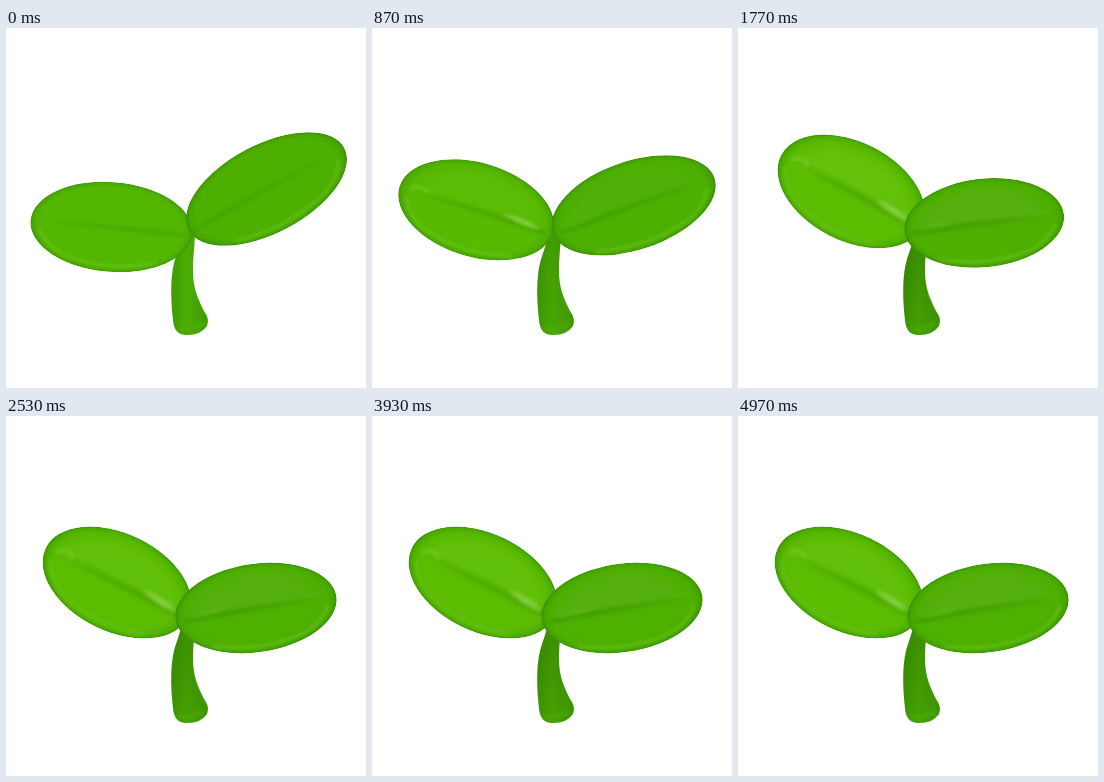
Animation, 360 px wide and 360 px high, one loop 5 s. Source, as an HTML page:

```html
<!DOCTYPE html>
<html lang="en">
<head>
<meta charset="utf-8">
<title>Sprout</title>
<style>
  html, body { margin: 0; width: 100%; height: 100%; overflow: hidden; background: #fff; }
  svg { display: block; width: 100vw; height: 100vh; }
</style>
</head>
<body>
<svg viewBox="0 0 360 360">
  <defs>
    <radialGradient id="leftBody">
      <stop offset=".88" stop-color="#53b701"/>
      <stop offset=".96" stop-color="#4bab02"/>
      <stop offset="1" stop-color="#3e9603"/>
    </radialGradient>
    <radialGradient id="rightBody">
      <stop offset=".88" stop-color="#4db000"/>
      <stop offset=".96" stop-color="#46a402"/>
      <stop offset="1" stop-color="#3a8f03"/>
    </radialGradient>
    <linearGradient id="stemBody">
      <stop offset="0" stop-color="#409a02"/>
      <stop offset=".4" stop-color="#4bad03"/>
      <stop offset="1" stop-color="#429d02"/>
    </linearGradient>
    <linearGradient id="stemShade" x2="0" y2="1">
      <stop offset="0" stop-color="#205f00" stop-opacity=".5"/>
      <stop offset="1" stop-color="#205f00" stop-opacity=".15"/>
    </linearGradient>
    <filter id="soft" x="-30%" y="-100%" width="160%" height="300%"><feGaussianBlur stdDeviation="1.8"/></filter>
    <filter id="softer" x="-30%" y="-60%" width="160%" height="220%"><feGaussianBlur stdDeviation="4"/></filter>
    <clipPath id="leafEdge"><ellipse rx="80" ry="46"/></clipPath>
  </defs>
  <g id="stem"></g>
  <g id="left"></g>
  <g id="right"></g>
</svg>
<script>
const LOOP = 5000;
const byId = id => document.getElementById(id);

// Turning points of the damped sway: 0 is rest, 1 leans fully to the right.
const turns = [[0, 1], [80, 1.13], [530, -.25], [830, .5], [1150, -.2], [2350, 0], [LOOP, 0]];

// Leaf geometry at rest, leaning right, and the bulge of the path between them.
const leaves = {
  left: {
    flip: -1, glow: '#62c006', upper: '#6cc618',
    rest: { x: 111, y: 166.5, length: 79.2, width: 49, angle: 25.7 },
    lean: { x: 105.5, y: 199, length: 81.3, width: 45, angle: 4.5 },
    bulge: { x: -17, angle: 4 }
  },
  right: {
    flip: 1, glow: '#4fb004', upper: '#5fb021',
    rest: { x: 250, y: 192, length: 81.3, width: 44.3, angle: -8.3 },
    lean: { x: 260.5, y: 161, length: 88, width: 44.3, angle: -27.8 },
    bulge: { x: 27, length: 4, angle: -5 }
  }
};

const leafArt = (side, { glow, upper }) => `
  <g clip-path="url(#leafEdge)">
    <ellipse rx="80" ry="46" fill="url(#${side}Body)"/>
    <ellipse class="glow" rx="72" ry="40" fill="${glow}" filter="url(#softer)"/>
    <path class="upper" d="M-68 0Q-52-34 0-36Q54-32 62 0Q0-4-68 0Z" fill="${upper}" filter="url(#softer)"/>
    <path class="vein" d="M-72 1Q0-4 62 0Q0 2-72 5Z" fill="#348d00" filter="url(#soft)"/>
    <path d="M-48 33Q0 47 46 32Q64 23 71 8" fill="none" stroke="#7ed02f" stroke-width="2.5" opacity=".5" filter="url(#soft)"/>
    <path class="shine" d="M-67 1Q-54-7-26-4Q-46 3-67 1Z" fill="#a0dc62" filter="url(#soft)"/>
    <path class="shine" d="M50-3Q63-10 68 0" fill="none" stroke="#86cf3c" stroke-width="2.5" filter="url(#soft)"/>
  </g>`;

const stemPath = 'M180 190C177 210 172 221 168 235C164 252 165 274 167 292Q168 306 179 307Q194 308 201 298Q204 291 198 283C191 269 187 259 187 243C187 226 189 215 189 204Q187 192 182 187Z';
byId('stem').innerHTML = `
  <path d="${stemPath}" fill="url(#stemBody)"/>
  <path id="shade" d="${stemPath}" fill="url(#stemShade)"/>
  <path d="M172 299Q180 305 197 295" fill="none" stroke="#55b30f" stroke-width="4" opacity=".45" filter="url(#soft)"/>`;
for (const side in leaves) byId(side).innerHTML = leafArt(side, leaves[side]);

function swayAt(time) {
  const next = turns.findIndex(([at]) => at > time);
  const [[t0, from], [t1, to]] = [turns[next - 1], turns[next]];
  const ease = (1 - Math.cos(Math.PI * (time - t0) / (t1 - t0))) / 2;
  return from + (to - from) * ease;
}

function placeLeaf(side, sway, light) {
  const { flip, rest, lean, bulge } = leaves[side];
  const at = key => rest[key] + (lean[key] - rest[key]) * sway + (bulge[key] || 0) * sway * (1 - sway);
  const leaf = byId(side);
  leaf.setAttribute('transform',
    `translate(${at('x')} ${at('y')}) rotate(${at('angle')}) scale(${flip * at('length') / 80} ${at('width') / 46})`);
  const fade = (selector, amount) =>
    leaf.querySelectorAll(selector).forEach(part => part.setAttribute('opacity', amount));
  fade('.glow', light * .7);
  fade('.upper', light * .5);
  fade('.vein', .3 + light * .2);
  fade('.shine', side === 'left' ? Math.min(.75, light * 1.3) : light * .15);
}

function draw(time) {
  const sway = swayAt(time);
  const light = Math.max(0, Math.min(1, .85 * (1 - sway)));
  for (const side in leaves) placeLeaf(side, sway, light);
  byId('shade').setAttribute('opacity', light);
}

const start = performance.now();
function tick() {
  draw((performance.now() - start) % LOOP);
  requestAnimationFrame(tick);
}
tick();
</script>
</body>
</html>
```
